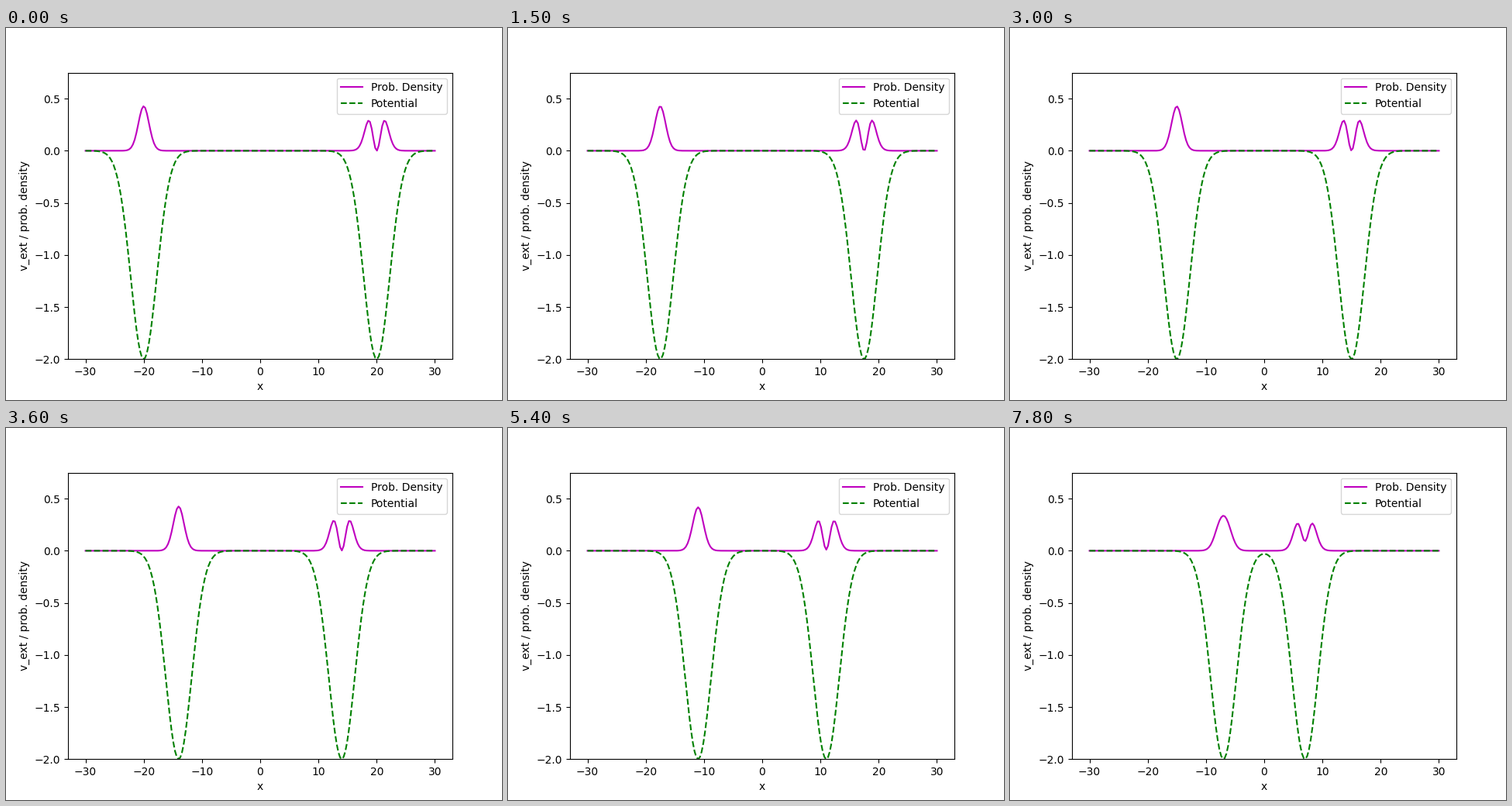
Write a matplotlib script that moves like this. It is 640 px wide and 480 px high and loops after 8 s.

```python
import numpy as np
import matplotlib.pyplot as plt
from matplotlib.animation import FuncAnimation

TICK_MS = 100
TICKS = 80
TICKS_PER_STEP = 3
START, SPEED = 20.0, 0.5      # well distance from the centre, shift per step
DEPTH, WIDTH_SQ = 2.0, 10.0
TRANSFER = 26.8               # strength of the dipole coupling between wells

x = np.linspace(-30, 30, 200)


def well(d):
    return -DEPTH * np.exp(-d**2 / WIDTH_SQ)


def bound_densities():
    """Densities of the two lowest states in a single well."""
    d = np.linspace(-10, 10, 401)
    h = d[1] - d[0]
    hop = np.full(d.size - 1, -0.5 / h**2)
    hamiltonian = np.diag(1 / h**2 + well(d)) + np.diag(hop, 1) + np.diag(hop, -1)
    states = np.linalg.eigh(hamiltonian)[1]
    return d, states[:, 0]**2 / h, states[:, 1]**2 / h


offsets, ground_state, excited_state = bound_densities()


def ground(d):
    return np.interp(d, offsets, ground_state, left=0, right=0)


def excited(d):
    return np.interp(d, offsets, excited_state, left=0, right=0)


def curves(tick):
    c = START - SPEED * (tick // TICKS_PER_STEP)
    left, right = x + c, x - c
    # The excitation hops across at a rate ~ 1/distance^3
    swap = np.sin(TRANSFER * (1 / c**2 - 1 / START**2))**2
    density = ((1 - swap) * (ground(left) + excited(right))
               + swap * (excited(left) + ground(right)))
    return density, well(left) + well(right)


fig, ax = plt.subplots(figsize=(6.4, 4.8), dpi=100)
density, potential = curves(0)
density_line, = ax.plot(x, density, "m-", label="Prob. Density")
potential_line, = ax.plot(x, potential, "g--", label="Potential")
ax.set_xlim(-33, 33)
ax.set_ylim(-2, 0.75)
ax.set_xlabel("x")
ax.set_ylabel("v_ext / prob. density")
ax.legend(loc="upper right")


def update(tick):
    density, potential = curves(tick)
    density_line.set_ydata(density)
    potential_line.set_ydata(potential)
    return density_line, potential_line


anim = FuncAnimation(fig, update, frames=TICKS, interval=TICK_MS,
                     repeat=True, repeat_delay=0)
plt.show()
```
